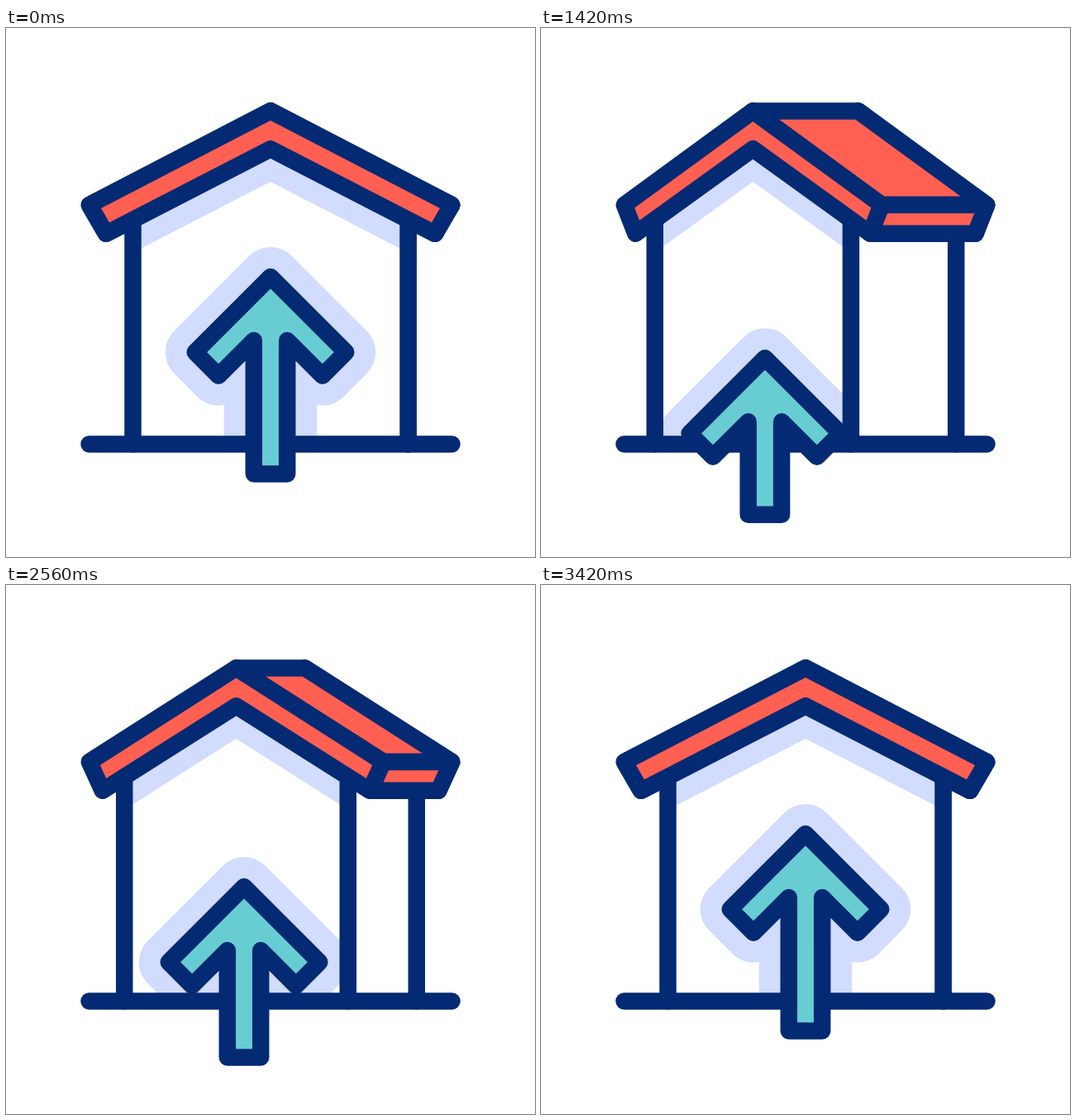
An HTML page with a canvas for the animation above (3.6 s loop, 640 by 640 pixels).

```html
<!DOCTYPE html>
<html lang="en">
<head>
<meta charset="utf-8">
<title>House and arrow</title>
<style>
  html, body { margin: 0; width: 100%; height: 100%; overflow: hidden; background: #fff; }
  canvas { display: block; width: 640px; height: 640px; }
</style>
</head>
<body>
<canvas id="stage" width="640" height="640"></canvas>
<script>
const ctx = document.getElementById('stage').getContext('2d');
const NAVY = '#042a74', RED = '#ff6052', TEAL = '#67cdd2', PALE = '#d2dcff';
const LOOP = 3600, TURN = 1600, OPEN_AT = 200, CLOSE_AT = 1804;
const LINE = 20.5, MID = 320, GROUND = 503.6;
const RIDGE = 100.4, EAVE = 214, RIDGE_LOW = 146.3, EAVE_LOW = 248.8, WALL_TOP = 232;

// cubic-bezier(.8, 0, .2, 1), solved by bisection
function ease(x) {
  if (x <= 0) return 0;
  if (x >= 1) return 1;
  let lo = 0, hi = 1;
  for (let i = 0; i < 30; i++) {
    const s = (lo + hi) / 2, r = 1 - s;
    if (2.4 * s * r * r + 0.6 * s * s * r + s * s * s < x) lo = s;
    else hi = s;
  }
  return lo * lo * (3 - 2 * lo);
}

function trace(points, closed = true) {
  ctx.beginPath();
  points.forEach(([x, y]) => ctx.lineTo(x, y));
  if (closed) ctx.closePath();
}

function shape(points, fill) {
  trace(points);
  ctx.fillStyle = fill;
  ctx.fill();
  outline(NAVY, LINE);
}

function outline(color, width) {
  ctx.strokeStyle = color;
  ctx.lineWidth = width;
  ctx.stroke();
}

function line(x1, y1, x2, y2) {
  trace([[x1, y1], [x2, y2]], false);
  outline(NAVY, LINE);
}

function gable(x, top, low) {
  return [
    [x, RIDGE], [x + top, EAVE], [x + low, EAVE_LOW],
    [x, RIDGE_LOW], [x - low, EAVE_LOW], [x - top, EAVE]
  ];
}

function arrowPoints(k) {
  const shift = 51.2 * k, x = MID - shift, tip = 301 + 2 * shift, end = 539.6 + shift;
  const half = [[20.2, end], [20.2, tip + 77], [62.9, tip + 119.7], [91.3, tip + 91.3]];
  return [
    ...half.map(([dx, y]) => [x + dx, y]),
    [x, tip],
    ...half.reverse().map(([dx, y]) => [x - dx, y])
  ];
}

function draw(k) {
  const swing = 66.4 * k;
  const front = MID - swing, back = MID + swing;
  const top = 219.2 - swing, low = 199 - 59.5 * k, wall = 166.5 - 50 * k;
  const arrow = arrowPoints(k);

  ctx.fillStyle = '#fff';
  ctx.fillRect(0, 0, 640, 640);
  ctx.lineJoin = ctx.lineCap = 'round';

  shape(gable(back, top, low), RED);
  line(back + wall, WALL_TOP, back + wall, GROUND);

  // Front wall with the shadows of the roof and the arrow
  const left = front - wall, right = front + wall;
  ctx.save();
  trace([[front, RIDGE_LOW], [right, WALL_TOP], [right, GROUND], [left, GROUND], [left, WALL_TOP]]);
  ctx.fillStyle = '#fff';
  ctx.fill();
  ctx.clip();
  const drop = 39.8;
  trace([
    [front, RIDGE_LOW], [front + low, EAVE_LOW], [front + low, EAVE_LOW + drop],
    [front, RIDGE_LOW + drop], [front - low, EAVE_LOW + drop], [front - low, EAVE_LOW]
  ]);
  ctx.fillStyle = PALE;
  ctx.fill();
  trace(arrow);
  ctx.fill();
  outline(PALE, 72);
  ctx.restore();

  line(left, WALL_TOP, left, GROUND);
  line(right, WALL_TOP, right, GROUND);
  line(100.5, GROUND, 539.5, GROUND);

  // Roof side, its edge, then the front gable
  shape([[front, RIDGE], [back, RIDGE], [back + top, EAVE], [front + top, EAVE]], RED);
  shape([[front + top, EAVE], [back + top, EAVE], [back + low, EAVE_LOW], [front + low, EAVE_LOW]], RED);
  shape(gable(front, top, low), RED);

  shape(arrow, TEAL);
}

const start = performance.now();
function frame(now) {
  const t = Math.max(0, now - start) % LOOP;
  draw(ease((t - OPEN_AT) / TURN) - ease((t - CLOSE_AT) / TURN));
  requestAnimationFrame(frame);
}
draw(0);
requestAnimationFrame(frame);
</script>
</body>
</html>
```
